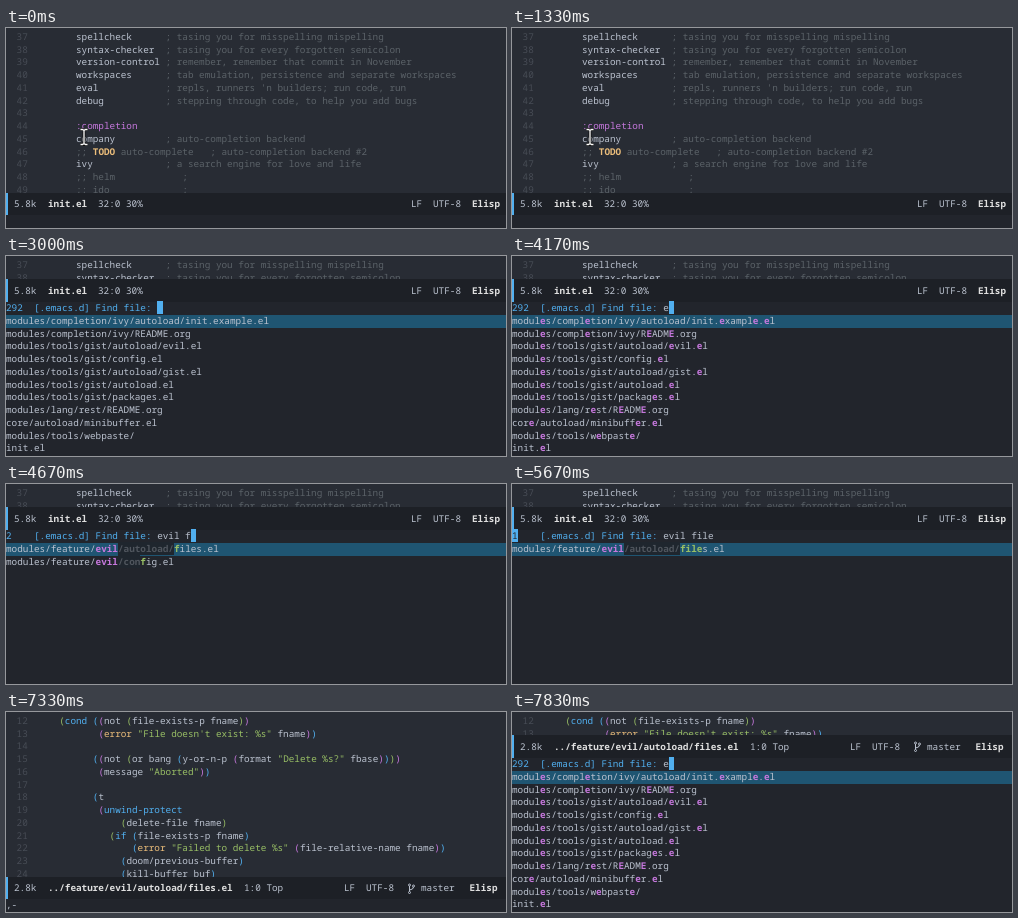
Animation, 500 px wide and 200 px high, one loop 8000 ms. Source, as an HTML page:

```html
<!DOCTYPE html>
<html lang="en">
<head>
<meta charset="utf-8">
<title>Editor file search</title>
<style>
html, body { margin: 0; width: 100%; height: 100%; overflow: hidden; background: #282c34; }
#stage {
  position: relative; width: 500px; height: 200px; overflow: hidden;
  background: #282c34; color: #bbc2cf;
  font: 9.333px/12.75px "Noto Sans Mono", "DejaVu Sans Mono", monospace;
  text-rendering: geometricPrecision; white-space: pre;
}
#stage div, #stage svg { position: absolute; }
#code { top: 2.8px; left: 10.6px; }
#code i { display: inline-block; width: 9px; }
#panel { left: 0; width: 500px; height: 200px; background: #22252c; }
#bar { width: 500px; height: 22.8px; background: #1d2026; }
#bar div { top: 5.2px; }
#bar .edge { top: 0; left: 0; width: 2px; height: 100%; background: #51afef; }
#bar b { color: #dfdfdf; }
#mini { top: 22.8px; width: 500px; }
#mini p { margin: 0; height: 12.75px; }
#mini .on { background: #1f5572; }
.num { color: #474c55; }
.dim { color: #5b6268; }
.mag { color: #c678dd; }
.todo { color: #ecbe7b; font-weight: bold; }
.blue { color: #51afef; }
.str { color: #98be65; }
.warn { color: #ecbe7b; }
.m0 { color: #c678dd; font-weight: bold; }
.m1 { color: #98be65; font-weight: bold; }
.gap { color: #50565e; background: #1f262e; font-weight: bold; }
.cur { background: #51afef; color: #22252c; }
</style>
</head>
<body>
<div id="stage">
  <div id="code"></div>
  <svg id="mouse" width="12" height="20" style="left:72px;top:99px" fill="none">
    <path id="beam" d="M2.5 2.5H4.500L6 3.500L7.500 2.500H9.500M6 3.500V16.500M2.500 17.500H4.500L6 16.500L7.500 17.500H9.500"/>
    <use href="#beam" stroke="#111" stroke-width="3"/>
    <use href="#beam" stroke="#fff" stroke-width="1.3"/>
  </svg>
  <div id="panel"><div id="bar"></div><div id="mini"></div></div>
</div>
<script>
const $ = id => document.getElementById(id);
const span = (cls, s) => `<span class="${cls}">${s}</span>`;

const settings = `spellcheck      ; tasing you for misspelling mispelling
syntax-checker  ; tasing you for every forgotten semicolon
version-control ; remember, remember that commit in November
workspaces      ; tab emulation, persistence and separate workspaces
eval            ; repls, runners 'n builders; run code, run
debug           ; stepping through code, to help you add bugs

:completion
company         ; auto-completion backend
;; TODO auto-complete   ; auto-completion backend #2
ivy             ; a search engine for love and life
;; helm            ;
;; ido             ;`.split("\n").map(s => " ".repeat(7) + s);

const lisp = `    (cond ((not (file-exists-p fname))
           (error "File doesn't exist: %s" fname))

          ((not (or bang (y-or-n-p (format "Delete %s?" fbase))))
           (message "Aborted"))

          (t
           (unwind-protect
               (delete-file fname)
             (if (file-exists-p fname)
                 (error "Failed to delete %s" (file-relative-name fname))
               (doom/previous-buffer)
               (kill-buffer buf)`.split("\n");

const files = `modules/completion/ivy/autoload/init.example.el
modules/completion/ivy/README.org
modules/tools/gist/autoload/evil.el
modules/tools/gist/config.el
modules/tools/gist/autoload/gist.el
modules/tools/gist/autoload.el
modules/tools/gist/packages.el
modules/lang/rest/README.org
core/autoload/minibuffer.el
modules/tools/webpaste/
init.el
modules/feature/evil/autoload/files.el
modules/feature/evil/config.el
modules/feature/evil/packages.el
modules/feature/evil/autoload/evil.el`.split("\n");

const paintSetting = s => s
  .replace(/;.*/, c => span("dim", c.replace("TODO", span("todo", "TODO"))))
  .replace(/:completion/, span("mag", "$&"));

// Lisp colours: strings, keywords and parens by nesting depth
const rainbow = ["#51afef", "#c678dd", "#98be65"];
let depth = 2;
const paren = p => {
  const level = p === "(" ? depth++ : --depth;
  return `<span style="color:${rainbow[level % 3]}">${p}</span>`;
};
const paintLisp = s => s.replace(/"[^"]*"|[()]|\b(cond|unwind-protect|if|error)\b/g, w =>
  w[0] === '"' ? span("str", w) :
  w.length === 1 ? paren(w) :
  span(w === "error" ? "warn" : "blue", w));

const number = (lines, first, paint) =>
  lines.map((s, i) => span("num", first + i) + "<i></i>" + paint(s)).join("\n");

const at = (x, html) => `<div style="left:${x}px">${html}</div>`;
const edge = `<div class="edge"></div>`;
const branch = `<svg style="left:401px;top:6px" width="10" height="12" fill="none" stroke="#bbc2cf">
  <circle cx="2.5" cy="2" r="1"/><circle cx="2.5" cy="9.5" r="1"/><circle cx="6.5" cy="3" r="1"/>
  <path d="M2.5 3V8.5M6.5 4Q6.500 6.500 2.500 7"/></svg>`;

const buffers = [
  {
    code: number(settings, 37, paintSetting),
    bar: edge + at(8, "5.8k") + at(42, "<b>init.el</b>") + at(92, "32:0 30%") +
      at(405, "LF") + at(427, "UTF-8") + at(466, "<b>Elisp</b>"),
  },
  {
    code: number(lisp, 12, paintLisp),
    bar: edge + at(8, "2.8k") + at(42, "<b>../feature/evil/autoload/files.el</b>") + at(238, "1:0 Top") +
      at(338, "LF") + at(360, "UTF-8") + branch + at(415, "master") + at(463.5, "<b>Elisp</b>"),
  },
];

function highlight(name, words) {
  if (!words.length) return name;
  if (words.length === 1) return name.replace(RegExp(words[0], "gi"), span("m0", "$&"));
  return name.replace(RegExp(`(${words[0]})(.*?)(${words[1]})`, "i"),
    (_, a, gap, b) => span("m0", a) + span("gap", gap) + span("m1", b));
}

function finder(input, done) {
  const words = input.split(" ").filter(Boolean);
  const found = files.filter(f => RegExp(words.join(".*?"), "i").test(f));
  let count = String(input.length < 2 ? 292 : found.length).padEnd(5);
  if (done) count = span("cur", count[0]) + count.slice(1);
  const prompt = span("blue", count + "[.emacs.d] Find file: ") + input + (done ? "" : span("cur", " "));
  const rows = found.slice(0, 11).map((f, i) => `<p class="${i ? "" : "on"}">${highlight(f, words)}</p>`);
  return `<p>${prompt}</p>` + rows.join("");
}

// [start ms, buffer, echo text or null, search input, accepted]
const steps = [
  [0, 0, ""], [2330, 0, ",-"],
  [2830, 0, null, ""], [4170, 0, null, "e"], [4330, 0, null, "ev"],
  [4500, 0, null, "evil"], [4670, 0, null, "evil f"], [4830, 0, null, "evil fil"],
  [5000, 0, null, "evil file"], [5500, 0, null, "evil file", true],
  [5830, 1, ""], [7330, 1, ",-"], [7500, 1, null, ""], [7830, 1, null, "e"],
];

let shown;
function draw(now) {
  const t = now % 8000;
  const step = steps.findLast(s => s[0] <= t);
  if (step !== shown) {
    const [, buffer, echo, input, done] = shown = step;
    const open = echo === null;
    $("code").innerHTML = buffers[buffer].code;
    $("bar").innerHTML = buffers[buffer].bar;
    $("panel").style.top = (open ? 23.4 : 164.5) + "px";
    $("mini").innerHTML = open ? finder(input, done) : `<p>${echo}</p>`;
    $("mouse").style.display = buffer || open ? "none" : "";
  }
  requestAnimationFrame(draw);
}
draw(0);
</script>
</body>
</html>
```
